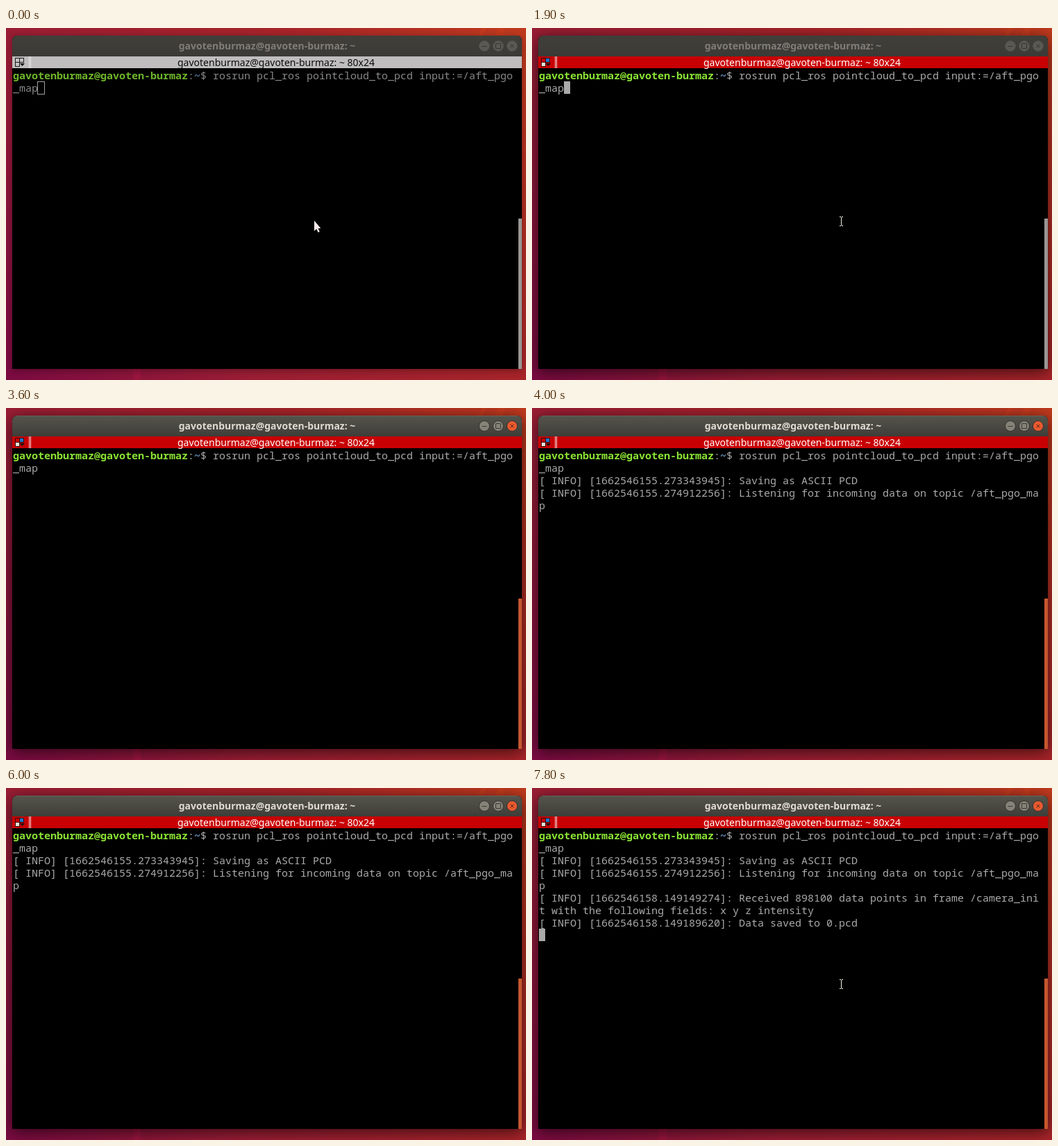
Recreate the animation shown at these times as an HTML page with a canvas. Size 749x508 px, loop 8000 ms.

```html
<!DOCTYPE html>
<html lang="en">
<head>
<meta charset="utf-8">
<title>Terminal</title>
<style>
html, body { margin: 0; width: 749px; height: 508px; overflow: hidden; background: #8b1a35; }
canvas { display: block; }
</style>
</head>
<body>
<canvas id="stage" width="749" height="508"></canvas>
<script>
const ctx = document.getElementById('stage').getContext('2d');
const LOOP = 8000, COL = 9, ROW = 18, LEFT = 10, TOP = 59;
const MONO = '15px "Noto Sans Mono", "DejaVu Sans Mono", monospace';
const SANS = '14px "Noto Sans", "Open Sans", sans-serif';
const USER = 'gavotenburmaz@gavoten-burmaz';
const COMMAND = ['rosrun pcl_ros pointcloud_to_pcd input:=/aft_pgo', '_map'];
const LOG = [
  { at: 4000, row: 2, text: '[ INFO] [1662546155.273343945]: Saving as ASCII PCD' },
  { at: 4000, row: 3, text: '[ INFO] [1662546155.274912256]: Listening for incoming data on topic /aft_pgo_ma' },
  { at: 4000, row: 4, text: 'p' },
  { at: 6600, row: 5, text: '[ INFO] [1662546158.149149274]: Received 898100 data points in frame /camera_ini' },
  { at: 6600, row: 6, text: 't with the following fields: x y z intensity' },
  { at: 6600, row: 7, text: '[ INFO] [1662546158.149189620]: Data saved to 0.pcd' }
];
// Visible spans of the block cursor: start, end, column, row
const BLINK = [
  [1900, 2600, 4, 1], [3000, 3600, 0, 2], [4500, 4800, 0, 5],
  [5400, 6000, 0, 5], [6600, 7200, 0, 8], [7800, 8000, 0, 8]
];

function rect(x, y, w, h, fill) {
  ctx.fillStyle = fill;
  ctx.fillRect(x, y, w, h);
}

function poly(points, fill) {
  ctx.beginPath();
  points.forEach(([x, y]) => ctx.lineTo(x, y));
  ctx.closePath();
  ctx.fillStyle = fill;
  ctx.fill();
}

function label(text, x, y, font, fill, align = 'left') {
  ctx.font = font;
  ctx.textAlign = align;
  ctx.fillStyle = fill;
  ctx.fillText(text, x, y);
}

function cellText(text, col, row, fill, bold) {
  label(text, LEFT + col * COL, TOP + row * ROW + 15, (bold ? 'bold ' : '') + MONO, fill);
}

function gradient(x0, y0, x1, y1, ...stops) {
  const g = ctx.createLinearGradient(x0, y0, x1, y1);
  stops.forEach(([at, color]) => g.addColorStop(at, color));
  return g;
}

function desktop(focused) {
  rect(0, 0, 749, 508, gradient(0, 508, 749, 0,
    [0, '#7b0a42'], [0.315, '#9a1d34'], [0.685, '#a82429'], [1, '#c03a1d']));
  const tint = 'rgba(214,66,30,0.35)';
  poly([[686, 0], [692, 0], [686, 11], [680, 11]], tint);
  poly([[709, 0], [719, 0], [716, 11], [704, 11]], tint);
  rect(183, 492, 11, 16, 'rgba(190,20,70,0.25)');
  ctx.save();
  ctx.shadowColor = focused ? 'rgba(0,0,0,0.65)' : 'rgba(0,0,0,0.35)';
  ctx.shadowBlur = focused ? 22 : 12;
  ctx.shadowOffsetY = focused ? 4 : 2;
  ctx.beginPath();
  ctx.roundRect(9, 11, 734, 481, [7, 7, 0, 0]);
  ctx.fillStyle = '#000';
  ctx.fill();
  ctx.restore();
}

function button(x, icon, fill, ink, edge) {
  ctx.beginPath();
  ctx.arc(x, 26, 7.5, 0, 7);
  ctx.fillStyle = fill;
  ctx.fill();
  ctx.lineWidth = 1;
  ctx.strokeStyle = edge;
  ctx.stroke();
  ctx.strokeStyle = ink;
  ctx.beginPath();
  if (icon === 'min') {
    ctx.moveTo(x - 3.5, 26.5);
    ctx.lineTo(x + 3.5, 26.5);
  } else if (icon === 'max') {
    ctx.rect(x - 3.5, 22.5, 7, 7);
  } else {
    ctx.moveTo(x - 2.5, 23.5);
    ctx.lineTo(x + 2.5, 28.5);
    ctx.moveTo(x + 2.5, 23.5);
    ctx.lineTo(x - 2.5, 28.5);
  }
  ctx.stroke();
}

function titleBar(active) {
  ctx.beginPath();
  ctx.roundRect(9, 11, 734, 30, [7, 7, 0, 0]);
  ctx.fillStyle = active
    ? gradient(0, 11, 0, 41, [0, '#55544c'], [1, '#3e3d38'])
    : gradient(0, 11, 0, 41, [0, '#403f3a'], [1, '#3b3a36']);
  ctx.fill();
  if (active) rect(15, 11, 722, 1, '#65645b');
  label(USER + ': ~', 376, 31, 'bold ' + SANS, active ? '#dfdbd2' : '#807d78', 'center');
  const fill = active ? '#858278' : '#5b5954';
  const ink = active ? '#3a3934' : '#353430';
  const edge = active ? '#33322e' : '#504f49';
  button(689, 'min', fill, ink, edge);
  button(709, 'max', fill, ink, edge);
  button(729, 'close', active ? '#ea5a30' : fill, active ? '#58210f' : ink, edge);
}

function groupIcon(focused) {
  if (focused) {
    rect(13, 43, 13, 13, '#3a0808');
    rect(14, 44, 5, 5, '#c80003');
    rect(20, 44, 5, 5, '#1e78c8');
    rect(14, 50, 5, 5, '#e4e4da');
    rect(20, 50, 6, 6, '#c80003');
  } else {
    rect(13, 43, 13, 13, '#1c1c1c');
    [[14, 44], [20, 44], [14, 50]].forEach(([x, y]) => rect(x, y, 5, 5, '#c4c2c2'));
    rect(20, 50, 6, 6, '#bebcbc');
  }
  poly([[20, 51], [27, 51], [23.5, 55]], '#111');
}

function paneBar(focused) {
  rect(9, 41, 734, 17, focused ? '#c80003' : '#bfbdbd');
  groupIcon(focused);
  rect(33, 41, 1, 17, focused ? '#f4dede' : '#e9e8e8');
  rect(35, 41, 1, 17, focused ? '#f4dede' : '#e9e8e8');
  label(USER + ': ~ 80x24', 389, 55, SANS, focused ? '#fff' : '#0c0c0c', 'center');
}

function terminal(t, focused) {
  const fg = focused ? '#aaaaaa' : '#888888';
  const n = USER.length;
  cellText(USER, 0, 0, focused ? '#8ae234' : '#6eb52a', true);
  cellText(':', n, 0, fg);
  cellText('~', n + 1, 0, focused ? '#729fcf' : '#5b7fa6', true);
  cellText('$', n + 2, 0, fg);
  COMMAND.forEach((s, row) => cellText(s, row ? 0 : n + 4, row, fg));
  LOG.forEach(line => { if (t >= line.at) cellText(line.text, 0, line.row, fg); });

  if (!focused) {
    ctx.lineWidth = 1;
    ctx.strokeStyle = '#a0a0a0';
    ctx.strokeRect(45.5, 77.5, 10, 18);
  }
  const on = BLINK.find(([from, to]) => t >= from && t < to);
  if (on) rect(LEFT + on[2] * COL, TOP + on[3] * ROW, COL, ROW, '#aaaaaa');
}

function pointer(t) {
  if (t < 100) {
    poly([[444, 278], [444, 293], [447.2, 290], [449.6, 295],
      [451.8, 294], [449.6, 289.3], [453.3, 289]], '#f6eaea');
    return;
  }
  if (t >= 3100 && t < 6600) return;
  const y = t < 3100 ? 279 : t < 6900 ? 280 : 283;
  const ink = '#f2f2e6';
  rect(445, y - 6, 1, 12, ink);
  [y - 7, y + 6].forEach(v => {
    rect(443, v, 2, 1, ink);
    rect(446, v, 2, 1, ink);
  });
}

function draw(t) {
  const focused = t >= 1900, active = t >= 2000;
  desktop(focused);
  titleBar(active);
  paneBar(focused);
  terminal(t, focused);
  rect(738, 275, 5, 217, active ? '#c4572f' : '#989694');
  pointer(t);
}

const start = performance.now();
function tick() {
  draw((performance.now() - start) % LOOP);
  requestAnimationFrame(tick);
}
tick();
</script>
</body>
</html>
```
